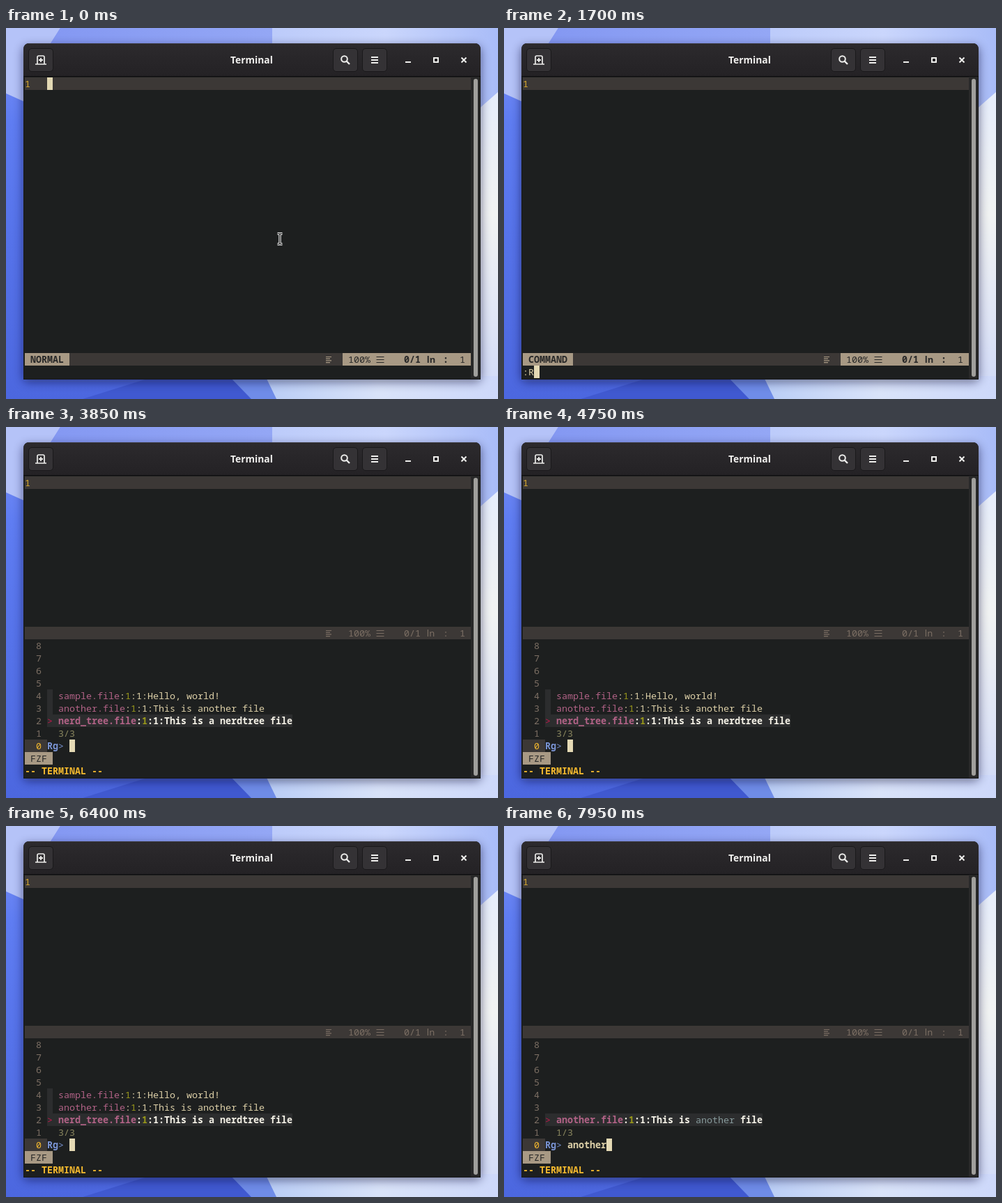
Write an HTML page that moves like this. It is 706 by 533 pixels and loops after 8000 ms.

```html
<!DOCTYPE html>
<html lang="en">
<head>
<meta charset="utf-8">
<title>Terminal</title>
<style>
  html, body { margin: 0; width: 100%; height: 100%; overflow: hidden; background: #5b78ec; }
  svg { display: block; width: 706px; height: 533px; }
  text { white-space: pre; }
  .mono { font: 13.333px "Noto Sans Mono", "DejaVu Sans Mono", monospace; }
  .b { font-weight: 700; }
  .title { font: 700 13.8px "Noto Sans", "Open Sans", sans-serif; }
  .ln { font-family: "Noto Sans", sans-serif; font-size: 13px; }
</style>
</head>
<body>
<svg viewBox="0 0 706 533" xmlns="http://www.w3.org/2000/svg">
  <defs>
    <linearGradient id="left" x1="0" y1="0" x2="0" y2="1">
      <stop offset="0" stop-color="#7d92f4"/><stop offset=".25" stop-color="#5f7df2"/>
      <stop offset=".6" stop-color="#5572e9"/><stop offset="1" stop-color="#4c67df"/>
    </linearGradient>
    <linearGradient id="top">
      <stop offset="0" stop-color="#8397f2"/><stop offset="1" stop-color="#94a7f5"/>
    </linearGradient>
    <linearGradient id="sky">
      <stop offset="0" stop-color="#bccbfa"/><stop offset=".5" stop-color="#cad6fc"/>
      <stop offset="1" stop-color="#a9bcf8"/>
    </linearGradient>
    <linearGradient id="pale" x1="0" y1="0" x2="0" y2="1">
      <stop offset="0" stop-color="#e6edfb"/><stop offset=".4" stop-color="#f1f3f3"/>
      <stop offset=".75" stop-color="#dfe5f6"/><stop offset="1" stop-color="#cfd9f8"/>
    </linearGradient>
    <linearGradient id="floor">
      <stop offset="0" stop-color="#b9cdf6"/><stop offset=".5" stop-color="#d9e3f9"/>
      <stop offset="1" stop-color="#cdd8fa"/>
    </linearGradient>
    <linearGradient id="head" x1="0" y1="0" x2="0" y2="1">
      <stop offset="0" stop-color="#2c2a2d"/><stop offset="1" stop-color="#242225"/>
    </linearGradient>
    <filter id="blur" x="-10%" y="-10%" width="120%" height="120%"><feGaussianBlur stdDeviation="7"/></filter>
  </defs>

  <rect width="706" height="533" fill="url(#left)"/>
  <path d="M0 0H78L40 60V112L0 94Z" fill="#b5c3f8"/>
  <path d="M78 0H382V60H40Z" fill="url(#top)"/>
  <path d="M382 0H706V140H382Z" fill="url(#sky)"/>
  <path d="M640 150L706 92V533H640Z" fill="url(#pale)"/>
  <path d="M110 533L215 500H320L352 533Z" fill="#4059d0"/>
  <path d="M352 533L320 500H372L388 533Z" fill="#6f8ce8"/>
  <path d="M388 533L372 500H706V533Z" fill="url(#floor)"/>

  <rect x="24" y="26" width="658" height="483" rx="8" fill="#0a1030" opacity=".5" filter="url(#blur)"/>
  <path d="M25 505V31Q25 22 34 22H672Q681 22 681 31V505Z" fill="#1d1f1f"/>
  <path d="M25 69V31Q25 22 34 22H672Q681 22 681 31V69Z" fill="url(#head)"/>
  <path d="M32 22.5H674" stroke="#3b393c"/>
  <path d="M25 69.5H681" stroke="#0f0e10"/>
  <rect x="667" y="70" width="14" height="435" fill="#282828"/>
  <rect x="671" y="73" width="6" height="428" rx="3" fill="#a09f9c"/>
  <path d="M25.5 70V504.5H680.5V70" fill="none" stroke="#171819"/>

  <g fill="#343235" stroke="#1a191b">
    <rect x="32.500" y="29.500" width="35" height="33" rx="4.500"/>
    <rect x="469.500" y="29.500" width="35" height="33" rx="4.500"/>
    <rect x="511.500" y="29.500" width="35" height="33" rx="4.500"/>
  </g>
  <text class="title" x="352.500" y="51" text-anchor="middle" fill="#f0efed">Terminal</text>
  <g fill="none" stroke="#eeeeec" stroke-width="2">
    <path d="M42 52H45V42Q45 40 47 40H53Q55 40 55 42V52H58M45 52H55" stroke-width="1.700"/>
    <path d="M50 43V49M47 46H53" stroke-width="1.800"/>
    <circle cx="485.500" cy="44.500" r="4.300"/><path d="M488.500 47.500L493 52" stroke-width="2.400"/>
    <path d="M524 42H534M524 46H534M524 50H534"/>
    <path d="M573 49H581"/>
    <rect x="614" y="43" width="6" height="6"/>
    <path d="M653.500 42.500L660.500 49.500M660.500 42.500L653.500 49.500"/>
  </g>

  <g id="screen" class="mono"></g>
</svg>
<script>
const LOOP = 8000;
const C = {
  fg: '#ddd0a8', bright: '#f4f1e6', bar: '#3c3836', tan: '#a89984', dark: '#282828',
  dim: '#7c6f64', gold: '#f5b92e', line: '#d9a92f', cursor: '#e4d9b4',
  pink: '#b16286', green: '#98971a', info: '#8a875f', blue: '#7a94d4',
  sel: '#2c2d2e', match: '#879a9b', red: '#c3184b'
};
const FILES = {
  sample: ['sample.file', 'Hello, world!'],
  another: ['another.file', 'This is another file'],
  nerd: ['nerd_tree.file', 'This is a nerdtree file']
};
// Key presses: [time, text]
const COMMAND = [[1300, ':'], [1650, ':R'], [1850, ':Rg']];
const OPEN = 2350;
const QUERY = [[6500, 'a'], [6750, 'an'], [6950, 'ano'], [7200, 'anot'],
               [7400, 'anoth'], [7550, 'anothe'], [7750, 'another']];

const screen = document.getElementById('screen');
const X = col => 27 + 8 * col;
const Y = row => 71 + 18 * row;
const typed = (keys, t) => keys.reduce((s, [at, text]) => t >= at ? text : s, '');

function box(row, col, cols, fill) {
  return `<rect x="${X(col)}" y="${Y(row)}" width="${cols * 8}" height="18" fill="${fill}"/>`;
}

function print(row, col, text, fill, cls = '') {
  const safe = text.replace(/&/g, '&amp;').replace(/</g, '&lt;').replace(/>/g, '&gt;');
  return `<text x="${X(col)}" y="${Y(row) + 14}" fill="${fill}" class="${cls}">${safe}</text>`;
}

function bars(x, y, widths, gap, color) {
  const d = widths.map((w, i) => `M${x} ${y + i * gap}h${w}`).join('');
  return `<path d="${d}" stroke="${color}" stroke-width="1.2" fill="none"/>`;
}

function status(row, active) {
  const ink = active ? C.dark : C.dim, b = active ? 'b' : '', y = Y(row);
  return box(row, 0, 80, C.bar) + (active ? box(row, 57, 23, C.tan) : '') +
    bars(459, y + 5.5, [8, 6, 8, 6], 2.7, active ? C.tan : C.dim) +
    print(row, 58, '100%', ink) + bars(531.5, y + 5.5, [11, 11, 11], 4, ink) +
    print(row, 68, '0/1', ink, b) + print(row, 72.1, 'ln', ink, 'ln ' + b) +
    print(row, 75, ':', ink, b) + print(row, 78, '1', ink);
}

function pointer() {
  const d = 'M389.5 295.500H392L393 296.500L394 295.500H396.500M393 296V310M389.500 310.500H392L393 309.500L394 310.500H396.500';
  return `<g fill="none"><path d="${d}" stroke="#eee" stroke-width="3.4"/><path d="${d}" stroke="#111" stroke-width="1.2"/></g>`;
}

// Columns of the message that the query hits
function hits(msg, query) {
  const found = new Set();
  let from = query ? msg.indexOf(' a') + 1 : 0;
  for (const ch of query) {
    const i = msg.indexOf(ch, from);
    found.add(i);
    from = i + 1;
  }
  return found;
}

function result(row, key, query, selected) {
  const [name, msg] = FILES[key], b = selected ? 'b' : '';
  const fg = selected ? C.bright : C.fg, n = name.length, start = 6 + n + 5;
  let out = selected
    ? box(row, 4, start - 4 + msg.length, C.sel) + print(row, 4, '>', C.red)
    : box(row, 4, 1, C.sel);
  out += print(row, 6, name, C.pink, b) + print(row, 6 + n, ':', fg, b) +
    print(row, 7 + n, '1', C.green, b) + print(row, 8 + n, ':1:', fg, b);
  const hit = hits(msg, query);
  for (let i = 0; i < msg.length;) {
    const on = hit.has(i);
    let j = i;
    while (j < msg.length && hit.has(j) === on) j++;
    out += print(row, start + i, msg.slice(i, j), on ? C.match : fg, on ? '' : b);
    i = j;
  }
  return out;
}

function finder(query) {
  const list = !query ? ['nerd', 'another', 'sample']
    : query.length < 3 ? ['another', 'nerd'] : ['another'];
  let out = status(12, false) + box(21, 0, 4, C.bar);
  for (let n = 0; n <= 8; n++) out += print(21 - n, 2, String(n), n ? C.dim : C.gold);
  list.forEach((key, i) => out += result(19 - i, key, query, i === 0));
  return out + print(20, 6, list.length + '/3', C.info) +
    print(21, 4, 'Rg', C.blue, 'b') + print(21, 6, '>', C.blue) +
    print(21, 8, query, C.fg, 'b') + box(21, 8 + query.length, 1, C.cursor) +
    box(22, 0, 5, C.tan) + print(22, 1, 'FZF', C.dark) +
    print(23, 0, '-- TERMINAL --', C.gold, 'b');
}

function editor(cmd) {
  const mode = cmd ? 'COMMAND' : 'NORMAL';
  return status(22, true) + box(22, 0, mode.length + 2, C.tan) + print(22, 1, mode, C.dark, 'b') +
    (cmd ? print(23, 0, cmd, C.fg) + box(23, cmd.length, 1, C.cursor)
         : box(0, 4, 1, C.cursor) + pointer());
}

let shown = '';
function draw(t) {
  const open = t >= OPEN, text = typed(open ? QUERY : COMMAND, t);
  const state = open + text;
  if (state === shown) return;
  shown = state;
  screen.innerHTML = box(0, 0, 80, C.bar) + print(0, 0, '1', C.line) +
    (open ? finder(text) : editor(text));
}

const begin = performance.now();
function tick() {
  draw((performance.now() - begin) % LOOP);
  requestAnimationFrame(tick);
}
tick();
</script>
</body>
</html>
```
